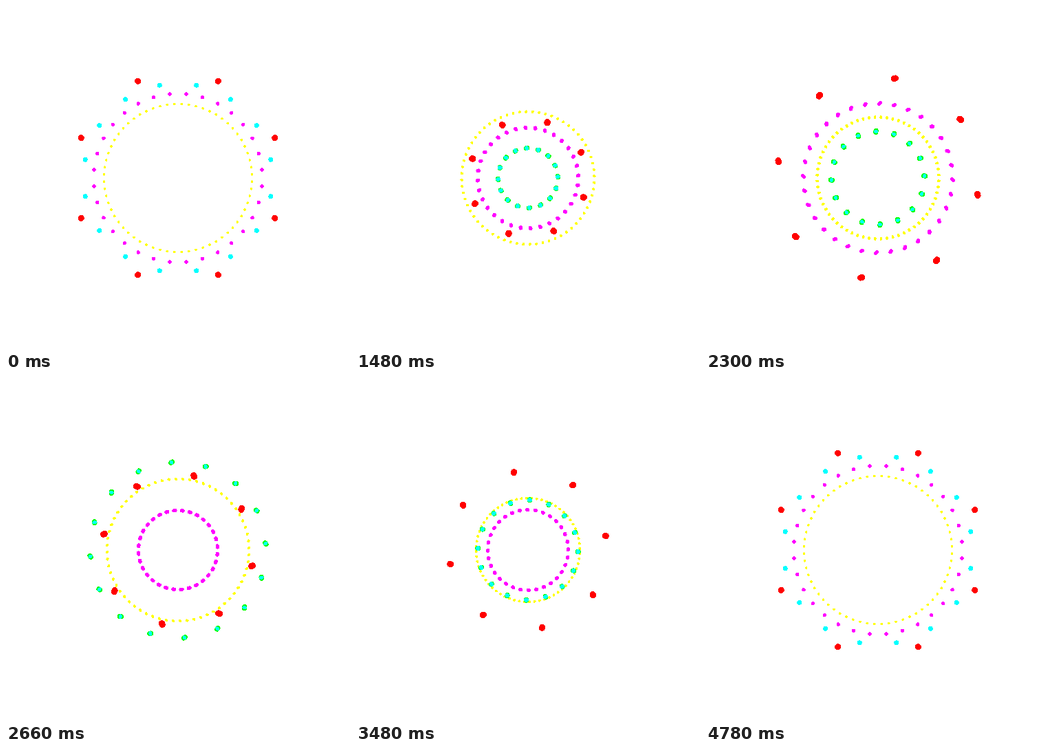
Animation of 500 by 500 pixels, one loop 4.8 s. Source, as an HTML page with a canvas:

```html
<!DOCTYPE html>
<html>
<head>
<meta charset="utf-8">
<style>
  html, body { margin: 0; height: 100%; overflow: hidden; background: #fff; }
  canvas { display: block; }
</style>
</head>
<body>
<canvas id="stage" width="500" height="500"></canvas>
<script>
const ctx = document.getElementById('stage').getContext('2d');
const TAU = 2 * Math.PI;
const FRAMES = 240, FRAME_MS = 20;
const CENTER = 250, RING = 90;
const SHUTTER = 0.14; // half exposure, in frames

// Every dot circles its own fixed centre on the common ring.
const groups = [
  { count: 64, orbit: 17.5, turns: 5, size: 1.8, core: '#ff0', edge: '#ff0' },
  { count: 32, orbit: 32.5, turns: 4, size: 2.7, core: '#f0f', edge: '#f0f' },
  { count: 16, orbit: 47.5, turns: 3, size: 3.6, core: '#0ff', edge: '#0f0' },
  { count: 8, orbit: 62.5, turns: 2, size: 4.6, core: '#f00', edge: '#f00' },
];

const ease = x => x < 0.5
  ? 0.5 * (2 * x) ** 2.4
  : 1 - 0.5 * (2 - 2 * x) ** 2.4;

function position(group, index, progress) {
  const base = (index + 0.5) / group.count * TAU;
  const angle = base + ease(progress) * group.turns * TAU;
  return [
    CENTER + RING * Math.cos(base) + group.orbit * Math.cos(angle),
    CENTER + RING * Math.sin(base) + group.orbit * Math.sin(angle),
  ];
}

// Hard-edged dot: core where all exposures overlap, edge where only some do.
function drawDot(points, { size, core, edge }) {
  const [cx, cy] = points[1];
  const reach = Math.ceil(size) + 3;
  for (let y = Math.floor(cy) - reach; y <= cy + reach; y++) {
    for (let x = Math.floor(cx) - reach; x <= cx + reach; x++) {
      const hits = points.filter(([px, py]) =>
        Math.hypot(x + 0.5 - px, y + 0.5 - py) < size).length;
      if (!hits) continue;
      ctx.fillStyle = hits === points.length ? core : edge;
      ctx.fillRect(x, y, 1, 1);
    }
  }
}

function draw(frame) {
  ctx.fillStyle = '#fff';
  ctx.fillRect(0, 0, 500, 500);
  const times = [-SHUTTER, 0, SHUTTER].map(s => (frame + 0.48 + s) / FRAMES);
  for (const group of groups) {
    for (let i = 0; i < group.count; i++) {
      drawDot(times.map(t => position(group, i, t)), group);
    }
  }
}

let start, shown = -1;
function tick(now) {
  start ??= now;
  const frame = Math.floor((now - start) / FRAME_MS + 0.001) % FRAMES;
  if (frame !== shown) draw(shown = frame);
  requestAnimationFrame(tick);
}
draw(0);
requestAnimationFrame(tick);
</script>
</body>
</html>
```
